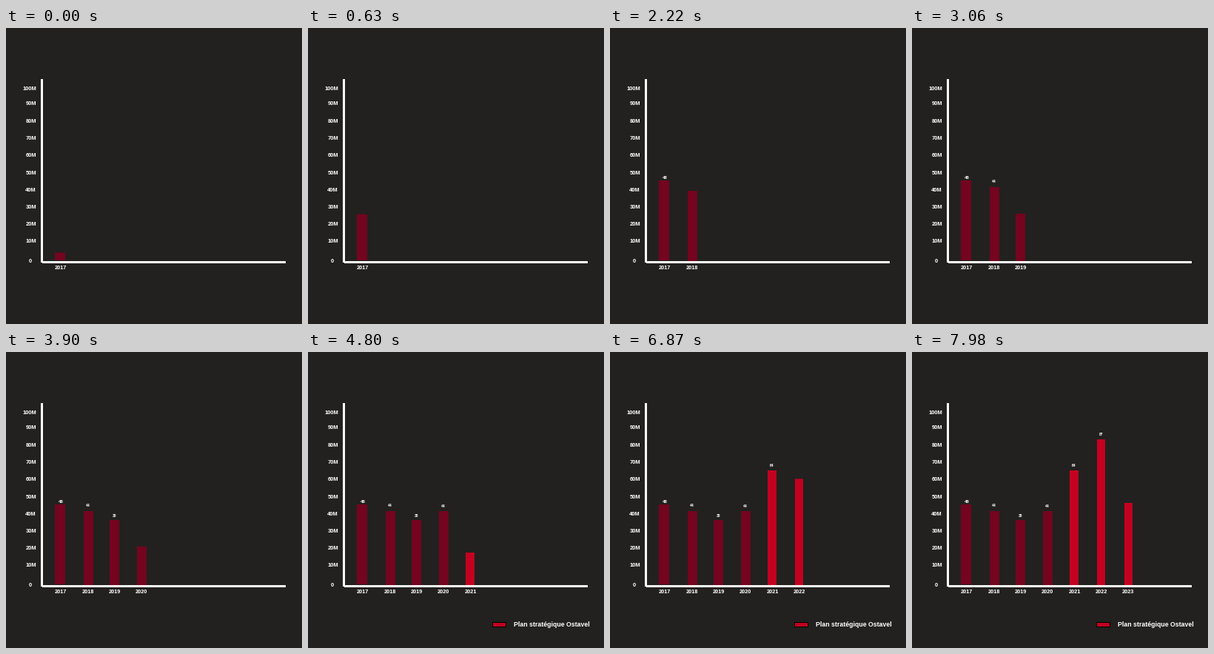
Animation of 400 by 400 pixels, one loop 8000 ms. Source, as a matplotlib script:

```python
import matplotlib.pyplot as plt
from matplotlib.animation import FuncAnimation
from matplotlib.patches import Rectangle

SIZE, DPI = 400, 100
LOOP, INTERVAL, STEP = 8000, 20, 30
BACK, WHITE = "#22211f", "#ffffff"
DARK, BRIGHT = "#74041f", "#c30020"
FLOOR = 315

fig = plt.figure(figsize=(SIZE / DPI, SIZE / DPI), dpi=DPI, facecolor=BACK)
ax = fig.add_axes([0, 0, 1, 1])
ax.set_xlim(0, SIZE)
ax.set_ylim(SIZE, 0)
ax.axis("off")


def box(x0, y0, x1, y1, color, edge="none"):
    return ax.add_patch(Rectangle((x0, y0), x1 - x0, y1 - y0, facecolor=color,
                                  edgecolor=edge, linewidth=0.72, snap=False))


def label(x, mid, text, px, ha="center"):
    """Place text so that its capitals are centred on mid."""
    return ax.text(x, mid + 0.36 * px, text, fontsize=px * 72 / DPI, ha=ha,
                   va="baseline", color=WHITE, weight="bold",
                   family="Liberation Sans")


# left, right, bottom, start ms, end ms, first top, last top, colour
BARS = [
    (66, 80, 314, 0, 1185, 303.5, 206, DARK),
    (105, 118, FLOOR, 1200, 2280, 306, 215, DARK),
    (140, 153, FLOOR, 2280, 3420, 303, 227, DARK),
    (177, 190, FLOOR, 3420, 4470, 303, 215, DARK),
    (213, 225, FLOOR, 4480, 5910, 303, 160, BRIGHT),
    (250, 261, FLOOR, 5910, 7260, 303, 118, BRIGHT),
    (287, 298, FLOOR, 7260, 8000, 303, 201.2, BRIGHT),
]
# year, its x, value, its x, y and size
NAMES = [
    ("2017", 73.5, "48", 74, 202, 6.2),
    ("2018", 110.5, "44", 110.8, 207.5, 5),
    ("2019", 147, "38", 147, 221.3, 5),
    ("2020", 183, "44", 183, 208.5, 5),
    ("2021", 220, "64", 219, 153.5, 5),
    ("2022", 256, "87", 256, 111.5, 5),
    ("2023", 291.5, "", 291.5, 200, 5),
]
LEGEND_START = 4480

# Axes and scale
box(47, 69, 50, 317, WHITE)
box(49, 315, 378, 318, WHITE)
label(33, 314.5, "0", 7.5)
for i, y in enumerate((288, 265, 242, 219, 196, 172, 149, 126, 102, 82)):
    label(41, y - 0.6, f"{10 * (i + 1)}M", 7.5, ha="right")

bars = []
for (x0, x1, base, _, _, y0, _, color), (year, cx, value, vx, vy, px) in zip(BARS, NAMES):
    bars.append((box(x0, y0, x1, base, color),
                 label(cx, 323.5, year, 7.4),
                 label(vx, vy, value, px)))

legend = [box(249.5, 365.5, 267.5, 371.5, BRIGHT, "black"),
          label(277.5, 368, "Plan stratégique Ostavel", 8.8, ha="left")]


def draw(i):
    t = round(i * INTERVAL / STEP) * STEP
    for (rect, name, count), spec in zip(bars, BARS):
        base, start, end, y0, y1 = spec[2:7]
        k = min(max((t - start) / (end - start), 0), 1)
        top = y0 + (y1 - y0) * k
        rect.set_y(top)
        rect.set_height(base - top)
        rect.set_visible(t >= start)
        name.set_visible(t >= start)
        count.set_visible(t >= end)
    for part in legend:
        part.set_visible(t >= LEGEND_START)
    return [part for group in bars for part in group] + legend


anim = FuncAnimation(fig, draw, frames=LOOP // INTERVAL, interval=INTERVAL,
                     init_func=lambda: draw(0), repeat=True, repeat_delay=0)
plt.show()
```
